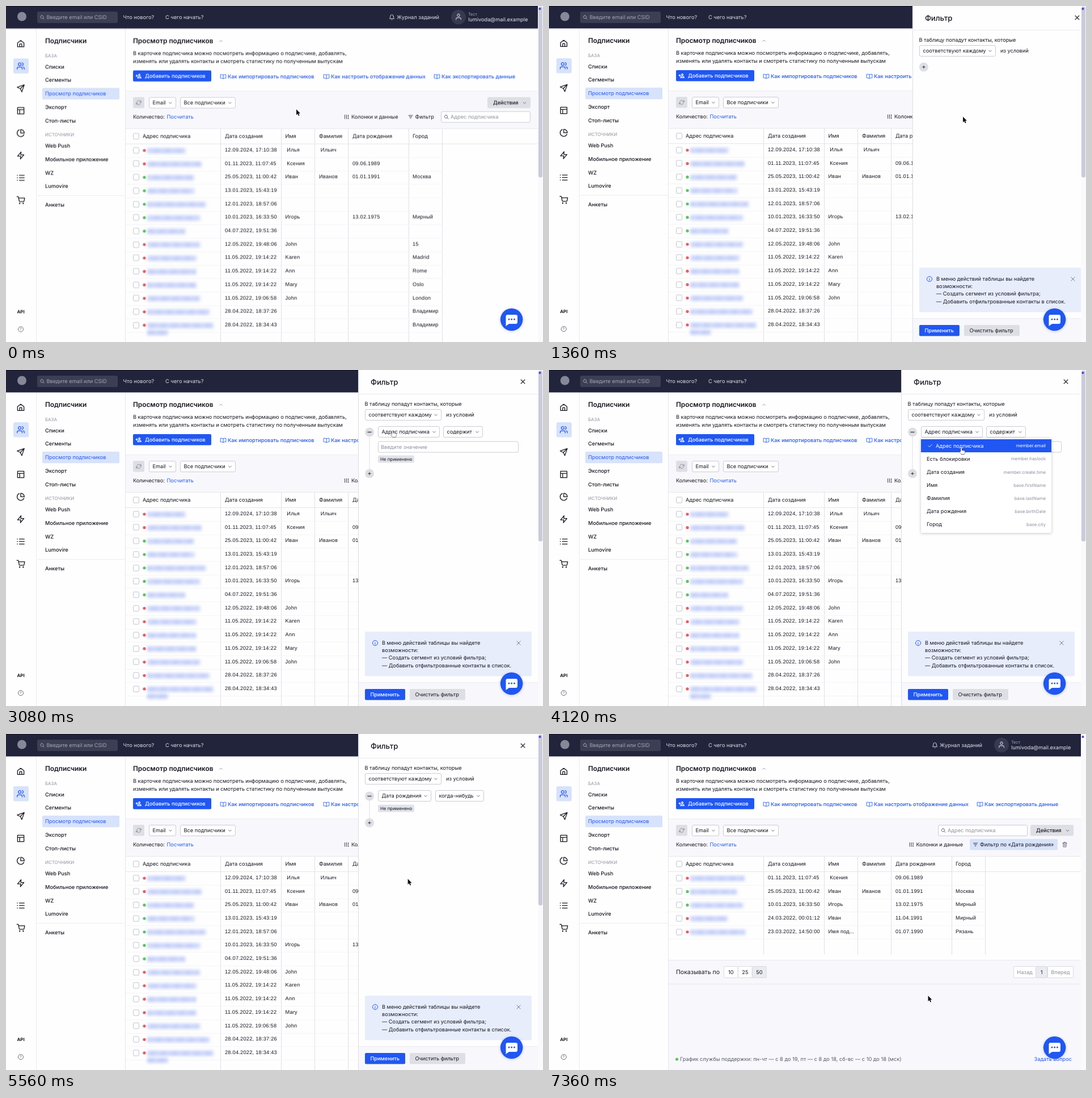
An HTML page with a canvas that plays this animation: 947 by 592 pixels, repeating every 8 s.

```html
<!DOCTYPE html>
<html lang="ru">
<head>
<meta charset="utf-8">
<title>Фильтр подписчиков</title>
<style>
html, body { margin: 0; width: 100%; height: 100%; overflow: hidden; background: #fff; }
canvas { display: block; width: 947px; height: 592px; }
</style>
</head>
<body>
<canvas id="stage" width="947" height="592"></canvas>
<script>
const W = 947, H = 592, LOOP = 8000;
const INK = '#15161f', BLUE = '#2057f3', PALE = '#d7e2fb', GREY = '#8d909e', LINE = '#dfe0e7', SOFT = '#f8f8fc', FLAT = '#dedfe5';
const BASE = 9.23, SMALL = 7.9, HEAD = 11.86;
const stage = document.getElementById('stage').getContext('2d');
let c = stage;

const ICONS = {
  home: 'M3 10 12 3 21 10V21H3ZM9 21V13h6v8',
  users: 'M16 21v-2a4 4 0 0 0-4-4H6a4 4 0 0 0-4 4v2M9 3a4 4 0 1 0 .01 0M22 21v-2a4 4 0 0 0-3-3.9M16 3.1a4 4 0 0 1 0 7.8',
  send: 'M22 2 11 13M22 2 15 22 11 13 2 9Z',
  layout: 'M3 3h18v18H3ZM3 9h18M9 21V9',
  pie: 'M21 16A10 10 0 1 1 8 2.8M22 12A10 10 0 0 0 12 2v10Z',
  bolt: 'M13 2 3 14h9l-1 8 10-12h-9Z',
  list: 'M8 5h14M8 12h14M8 19h14M2 5h1M2 12h1M2 19h1',
  cart: 'M1 2h4l2.7 12.4a2 2 0 0 0 2 1.6h9.7a2 2 0 0 0 2-1.6L23 6H6M9 20a1 1 0 1 0 .01 0M19 20a1 1 0 1 0 .01 0',
  bell: 'M18 8A6 6 0 0 0 6 8c0 7-3 9-3 9h18s-3-2-3-9M13.7 21a2 2 0 0 1-3.4 0',
  user: 'M20 21v-2a4 4 0 0 0-4-4H8a4 4 0 0 0-4 4v2M12 3a4 4 0 1 0 .01 0',
  add: 'M21 20v-1a4 4 0 0 0-4-4h-5a4 4 0 0 0-4 4v1ZM14.5 5a3 3 0 1 0 .01 0M1 11h7M4.5 7.5v7',
  find: 'M10 2a8 8 0 1 0 .01 0M16 16l6 6',
  book: 'M12 6C9 4 5 4 1 4v15c4 0 8 0 11 2 3-2 7-2 11-2V4c-4 0-8 0-11 2v15',
  refresh: 'M22 4v6h-6M2 20v-6h6M4 9a9 9 0 0 1 15-3l3 4M2 14l3 4a9 9 0 0 0 15-3',
  columns: 'M3 3v18M11 3v18M19 3v10M19 18a1.5 1.5 0 1 0 .01 0',
  filter: 'M2 5h20M6 12h12M10 19h4',
  trash: 'M3 6h18M5 6l1 16h12l1-16M8 6V2h8v4M10 11v6M14 11v6',
  down: 'M4 8l8 8 8-8',
  up: 'M4 16l8-8 8 8',
  cross: 'M3 3l18 18M21 3 3 21',
  check: 'M3 12l6 6L21 5',
  plus: 'M12 3v18M3 12h18'
};

function text(s, x, y, color = INK, size = BASE, weight = 400, align = 'left', family = 'Inter') {
  c.font = `${weight} ${size}px ${family}, sans-serif`;
  c.textAlign = align;
  c.fillStyle = color;
  c.fillText(s, x, y + size * .36);
}

function box(x, y, w, h, fill, r = 0, border) {
  c.beginPath();
  c.roundRect(x, y, w, h, r);
  if (fill) { c.fillStyle = fill; c.fill(); }
  if (border) { c.strokeStyle = border; c.lineWidth = 1; c.stroke(); }
}

function dot(x, y, r, fill) {
  c.beginPath();
  c.arc(x, y, r, 0, 7);
  c.fillStyle = fill;
  c.fill();
}

function icon(name, x, y, size, color = INK, width = 2) {
  c.save();
  c.translate(x - size / 2, y - size / 2);
  c.scale(size / 24, size / 24);
  c.strokeStyle = color;
  c.lineWidth = width;
  c.lineJoin = c.lineCap = 'round';
  c.stroke(new Path2D(ICONS[name]));
  c.restore();
}

function select(x, y, w, label) {
  box(x + .5, y + .5, w - 1, 19, '#fff', 2.5, '#cbccd5');
  text(label, x + 6.5, y + 9.8);
  icon('down', x + w - 10, y + 10.3, 7, '#55586a', 3);
}

function searchField(x, y) {
  box(x + .5, y + .5, 157, 19, '#fff', 2.5, '#cbccd5');
  icon('find', x + 9.5, y + 10, 8, '#55586a', 3);
  text('Адрес подписчика', x + 17, y + 9.8, GREY);
}

function checkbox(y) {
  box(224.5, y - 5, 10, 10, '#fff', 1.5, '#c3c4ce');
}

function chrome() {
  box(0, 0, 938, 39.5, '#22243c');
  box(0, 0, 938, 1, '#0c0d18');
  dot(28, 18.5, 8, '#858896');
  box(55, 10, 142, 20, '#3c3f54', 3);
  icon('find', 64, 20, 8, '#b4b6c2', 2.6);
  text('Введите email или CSID', 71.5, 20, '#a3a5b3');
  text('Что нового?', 206.5, 20, '#dcdde4');
  text('С чего начать?', 281, 20, '#dcdde4');
  icon('bell', 680.5, 20, 11, '#dcdde4');
  text('Журнал заданий', 689, 20, '#dcdde4');
  dot(798, 19.5, 13, '#363950');
  icon('user', 798, 19, 13, '#c9cbd6');
  text('Тест', 815, 14, '#a3a5b3', 7.25);
  text('lumivoda@mail.example', 815, 24, '#e4e5ea');
}

function sidebar() {
  box(53, 39, 1, 553, '#ececf1');
  box(210, 39, 1, 553, '#e6e7ec');
  box(13, 92, 27, 26.5, PALE, 3);
  ['home', 'users', 'send', 'layout', 'pie', 'bolt', 'list', 'cart'].forEach((n, i) =>
    icon(n, 26, 65.8 + i * 39.4, 15, i === 1 ? BLUE : INK, 2.1));
  text('API', 26, 537.8, INK, SMALL, 700, 'center');
  box(21.5, 564.5, 9, 9, null, 4.5, '#6c6f7e');
  text('?', 26, 569, '#6c6f7e', 6.5, 500, 'center');

  const item = (s, y, on) => text(s, 69, y, on ? BLUE : INK, BASE, on ? 400 : 500);
  text('Подписчики', 69, 61.1, INK, HEAD, 600);
  box(64, 143.7, 136, 20.5, PALE, 2);
  text('БАЗА', 69, 86.7, GREY, SMALL);
  ['Списки', 'Сегменты', 'Просмотр подписчиков', 'Экспорт', 'Стоп-листы'].forEach((s, i) =>
    item(s, 106.4 + i * 23.7, i === 2));
  text('ИСТОЧНИКИ', 69, 225.8, GREY, SMALL);
  ['Web Push', 'Мобильное приложение', 'WZ', 'Lumovire'].forEach((s, i) => item(s, 245.9 + i * 23.7));
  box(55, 333, 154, 1, '#ececf1');
  item('Анкеты', 349.2);
}

function intro() {
  text('Просмотр подписчиков', 224, 61.1, INK, HEAD, 600);
  icon('up', 379, 61.2, 7, '#7b7e8c', 2.5);
  text('В карточке подписчика можно посмотреть информацию о подписчике, добавлять,', 224, 83.1);
  text('изменять или удалять контакты и смотреть статистику по полученным выпускам', 224, 96.4);
  box(224, 113, 138, 19.5, BLUE, 2);
  icon('add', 234, 122.8, 11, '#fff', 2.6);
  text('Добавить подписчиков', 245, 122.8, '#fff', BASE, 500);
  [[391, 'Как импортировать подписчиков'], [573, 'Как настроить отображение данных'], [768, 'Как экспортировать данные']].forEach(([x, s]) => {
    icon('book', x - 8, 123.7, 10.5, BLUE);
    text(s, x, 123.2, BLUE, BASE, 500);
  });
}

function filterLabel(hover) {
  if (hover) box(704, 185, 57, 19.5, '#cfdcfb', 2);
  icon('filter', 713.5, 194.8, 8.5, INK, 2.4);
  text('Фильтр', 721.5, 194.8);
}

function toolbar(filtered) {
  box(211, 149, 727, 67, SOFT);
  box(211, 149, 727, 1, '#ececf1');
  box(224, 160, 20, 19.5, FLAT, 2.5);
  icon('refresh', 234, 169.8, 10, '#7b7e8c');
  select(252, 160, 48, 'Email');
  select(307, 160, 98, 'Все подписчики');
  box(849, 160, 76, 19.5, FLAT, 2.5);
  text('Действия', 859, 169.8, INK, BASE, 500);
  icon('down', 914.5, 170.3, 7, '#55586a', 3);
  text('Количество:', 224, 194.8);
  text('Посчитать', 283.5, 194.8, BLUE);
  const x = filtered ? 647.5 : 609;
  icon('columns', x - 8, 194.8, 9, INK, 2.2);
  text('Колонки и данные', x, 194.8);
  if (filtered) {
    searchField(686, 160);
    box(742, 185, 155, 19.5, PALE, 2);
    icon('filter', 752, 194.8, 8.5, INK, 2.4);
    text('Фильтр по «Дата рождения»', 760, 194.8);
    icon('trash', 909.5, 194.8, 10, '#55586a');
  } else {
    filterLabel(false);
    searchField(767, 185);
  }
}

// date | first name | last name | birthday | city | width of the hidden address, minus = inactive
const ALL = `12.09.2024, 17:10:38| Илья| Ильич|||-70
01.11.2023, 11:07:45| Ксения||09.06.1989||-98
25.05.2023, 11:00:42|Иван|Иванов|01.01.1991|Москва|85
13.01.2023, 15:43:19|||||86
12.01.2023, 18:57:06|||||106
10.01.2023, 16:33:50|Игорь||13.02.1975|Мирный|96
04.07.2022, 19:51:36|||||70
12.05.2022, 19:48:06|John|||15|-96
11.05.2022, 19:14:22|Karen|||Madrid|-89
11.05.2022, 19:14:22|Ann|||Rome|-89
11.05.2022, 19:14:22|Mary|||Oslo|-89
11.05.2022, 19:06:58|John|||London|-96
28.04.2022, 18:37:26||||Владимир|-112
28.04.2022, 18:34:43||||Владимир|-119`.split('\n');
const FOUND = [ALL[1], ALL[2], ALL[5],
  '24.03.2022, 00:01:12|Иван||11.04.1991|Мирный|-68',
  '23.03.2022, 14:50:00|Имя под...||01.07.1990|Рязань|-100'];
const COLS = [386, 492.5, 552, 611, 717];

function smear(x, y, w, seed) {
  c.save();
  c.filter = 'blur(2.8px)';
  box(x, y - 4.5, w, 10, 'rgba(160,180,250,.36)');
  for (let k = 0; k < w - 4; k += 5) {
    const r = Math.abs(Math.sin(seed * 12.9 + k * 7.7));
    box(x + k, y - 3, 5, 7, `rgba(90,120,235,${.06 + r * .14})`);
  }
  c.restore();
}

function table(rows, bottom) {
  box(211, 215, 727, 1, '#e6e7ec');
  box(211, 242, 727, 1, '#e6e7ec');
  [378, 485, 544, 603, 710, 769].forEach(x => box(x, 216, 1, bottom - 216, LINE));
  checkbox(229);
  text('Адрес подписчика', 241, 229);
  ['Дата создания', 'Имя', 'Фамилия', 'Дата рождения', 'Город'].forEach((s, i) => text(s, COLS[i], 229));
  rows.forEach((row, i) => {
    const y = 252.6 + i * 23.69, cells = row.split('|'), w = +cells.pop();
    box(211, Math.round(y + 13.4), 559, 1, '#f5f5f8');
    checkbox(Math.round(y + 1.2));
    dot(244, y + 1.4, 2.6, w < 0 ? '#ec5c5e' : '#58c75c');
    smear(249, y + 1.4, Math.abs(w) - 2, w + y);
    if (w === -119) smear(249, y + 14, 37, 3);
    c.letterSpacing = '.24px';
    cells.forEach((s, k) => text(s, COLS[k], y, INK, BASE, 400, 'left', '"Liberation Sans", Arial'));
    c.letterSpacing = '0px';
  });
}

function pager() {
  box(211, 399, 727, 193, SOFT);
  box(211, 398, 727, 1, '#e6e7ec');
  box(211, 440, 727, 1, '#e6e7ec');
  text('Показывать по', 224, 419.5, INK, 10.54);
  const cell = (x, w, s, on, color) => {
    box(x + .5, 409.5, w, 20, on ? '#eaebf1' : '#fff', 1, '#d9dae2');
    text(s, x + w / 2 + .5, 419.7, color, BASE, 400, 'center');
  };
  ['10', '25', '50'].forEach((s, i) => cell(308 + i * 25, 24.6, s, i === 2));
  cell(819, 39, 'Назад', false, GREY);
  cell(879, 45, 'Вперед', false, GREY);
  cell(858, 20, '1', true);
  dot(225.5, 573, 2.6, '#58c75c');
  text('График службы поддержки: пн-чт — с 8 до 19, пт — с 8 до 18, сб-вс — с 10 до 18 (мск)', 231, 573, '#555869');
  text('Задать вопрос', 922, 573, BLUE, BASE, 400, 'right');
}

function makePage(filtered) {
  const layer = document.createElement('canvas');
  layer.width = W;
  layer.height = H;
  c = layer.getContext('2d');
  c.textRendering = 'geometricPrecision';
  box(0, 0, W, H, '#fefefe');
  sidebar();
  intro();
  toolbar(filtered);
  table(filtered ? FOUND : ALL, filtered ? 389 : H);
  if (filtered) pager();
  chrome();
  box(938, 0, 9, H, '#fafafc');
  if (!filtered) box(939, 1, 7, 301, '#c9cadb', 3);
  dot(941.5, 5, 2, '#4040ee');
  c = stage;
  return layer;
}

function round(x, y, name) {
  dot(x, y, 8, FLAT);
  if (name) icon(name, x, y, 6, INK, 3.4);
  else [-2.4, 0, 2.4].forEach(d => dot(x + d, y, .9, INK));
}

function tag(y) {
  box(656, y - 6.5, 64, 13, '#e2e3ea', 2);
  text('Не применено', 660, y, INK, SMALL);
}

const FIELDS = ['Адрес подписчика|member.email', 'Есть блокировки|member.haslock', 'Дата создания|member.create.time',
  'Имя|base.firstName', 'Фамилия|base.lastName', 'Дата рождения|base.birthDate', 'Город|base.city'];

function dropdown(y) {
  c.save();
  c.shadowColor = 'rgba(30,35,70,.25)';
  c.shadowBlur = 5;
  c.shadowOffsetY = 1;
  box(656, 120, 230, 167, '#fff', 2);
  c.restore();
  const hover = Math.floor((y - 122) / 23.05);
  FIELDS.forEach((f, i) => {
    const [label, key] = f.split('|'), cy = 133.6 + i * 23.05, on = i === hover;
    if (on) box(656, Math.round(cy - 11.5), 230, 23, BLUE);
    if (i === 0) icon('check', 672, cy, 8, on ? '#fff' : '#55586a', 2.4);
    text(label, i ? 666 : 682, cy, on ? '#fff' : INK);
    text(key, 876, cy, on ? '#fff' : GREY, SMALL, 400, 'right');
  });
}

function panel(t, p, cur) {
  c.save();
  c.beginPath();
  c.rect(0, 0, 938, H);
  c.clip();
  c.translate(317 * (1 - p), 0);
  box(621, 0, 317, H, '#fefefe');
  box(621, 0, 1, H, '#dcdde4');
  box(622, 42, 316, 1, '#ececf1');
  text('Фильтр', 643, 20.8, INK, 13.18, 500);
  icon('cross', 911.5, 20.5, 9, INK, 3.4);
  text('В таблицу попадут контакты, которые', 632.5, 59.8);
  select(633, 69, 135, 'соответствуют каждому');
  text('из условий', 776, 78.8);

  if (t < 2600) round(641, 107.5, 'plus');
  else {
    const dated = t >= 4840, end = dated ? 156.5 : 182.5;
    box(640.5, 117, 1, end - 117, LINE);
    round(641, 109.5);
    round(641, end, 'plus');
    if (dated) {
      select(656, 99, 94, 'Дата рождения');
      select(757, 99, 86, 'когда-нибудь');
      tag(131);
    } else {
      select(656, 99, 109, 'Адрес подписчика');
      select(771, 99, 70, 'содержит');
      box(656.5, 126, 247, 19, '#fff', 2.5, '#cbccd5');
      text('Введите значение', 661, 135.7, GREY);
      tag(157);
      if (t >= 3400) dropdown(cur.y);
    }
  }

  box(633, 461, 294, 78.5, '#e8edfc', 2.5);
  box(646.5, 476.5, 9, 9, null, 4.5, BLUE);
  text('i', 651, 481, BLUE, 7, 600, 'center');
  icon('cross', 904, 481, 8.5, '#6c6f7e', 2.6);
  ['В меню действий таблицы вы найдете', 'возможности:', '— Создать сегмент из условий фильтра;',
    '— Добавить отфильтрованные контакты в список.'].forEach((s, i) => text(s, 663, 480.9 + i * 13.1));
  box(622, 551, 316, 41, SOFT);
  box(622, 550, 316, 1, '#ececf1');
  box(633, 562, 71, 19.5, t > 5560 && cur.y > 561 ? '#517bf7' : BLUE, 2);
  text('Применить', 642.5, 571.5, '#fff', BASE, 500);
  box(712, 562, 98, 19.5, FLAT, 2);
  text('Очистить фильтр', 721.5, 571.5);
  c.restore();
}

function chat() {
  c.save();
  c.shadowColor = 'rgba(20,40,120,.22)';
  c.shadowBlur = 5;
  c.shadowOffsetY = 1;
  dot(891.6, 552.5, 19.8, BLUE);
  c.restore();
  c.fillStyle = '#fff';
  c.fill(new Path2D('M884.5 544H899a3 3 0 0 1 3 3v10a3 3 0 0 1-3 3H887l-5.5 4V547a3 3 0 0 1 3-3Z'));
  [887, 891.7, 896.4].forEach(x => dot(x, 552, 1.5, BLUE));
}

const clamp = v => Math.max(0, Math.min(1, v));
const smooth = v => v * v * (3 - 2 * v);
const soft = v => (v + smooth(v)) / 2;
const out = v => 1 - (1 - v) ** 2;

// start, end, target x, target y, sideways bulge, easing
const MOVES = [
  [220, 920, 730, 195, 0, soft],
  [1660, 2440, 641, 107, 55, soft],
  [3040, 3200, 732, 107, 0, out],
  [3940, 4640, 709, 250, 0, soft],
  [5540, 6240, 685, 570, 0, soft],
  [6930, 7360, 668.5, 461, 0, soft]
];

function cursorAt(t) {
  let x = 512, y = 182;
  for (const [a, b, tx, ty, bulge, ease] of MOVES) {
    const k = ease(clamp((t - a) / (b - a)));
    x += (tx - x) * k + bulge * 4 * k * (1 - k) ** 2;
    y += (ty - y) * k;
  }
  const hand = t < 1240 ? x > 703
    : t < 2600 ? x < 650 && y < 117
    : t < 4840 || (t < 6560 && y > 561);
  return { x, y, hand };
}

const ARROW = new Path2D('M0 0V10L2.3 7.9 3.9 11.5 5.6 10.7 4 7.3H7Z');
const HAND = new Path2D('M-.9.6Q0-.6.9.6V4.4Q2 3.7 2.7 4.7 4 4.1 4.6 5.1 6.2 4.8 6.3 6.2V8.2Q6.2 9.6 5.2 11H-.2Q-1.4 9.2-2.9 7.2-3.2 5.9-1.8 6.1L-.9 7Z');

function cursor({ x, y, hand }) {
  c.save();
  c.translate(x, y);
  c.lineJoin = 'round';
  c.lineWidth = hand ? 1 : 1.4;
  c.strokeStyle = hand ? '#111' : '#fff';
  c.fillStyle = hand ? '#fff' : '#111';
  const shape = hand ? HAND : ARROW;
  c.stroke(shape);
  c.fill(shape);
  c.restore();
}

stage.textRendering = 'geometricPrecision';
const full = makePage(false), found = makePage(true);

function frame() {
  const t = performance.now() % LOOP, cur = cursorAt(t);
  c.drawImage(t < 6520 ? full : found, 0, 0);
  if (t < 240) c.drawImage(full, 0, 40, 938, 552, 0, 40.45, 938, 552);
  if (t < 1520 && cur.x > 703) filterLabel(true);
  const p = t < 6400 ? 1 - (1 - clamp((t - 1120) / 400)) ** 3 : 1 - smooth(clamp((t - 6480) / 240));
  if (p > 0) panel(t, p, cur);
  chat();
  cursor(cur);
  requestAnimationFrame(frame);
}
frame();
</script>
</body>
</html>
```
